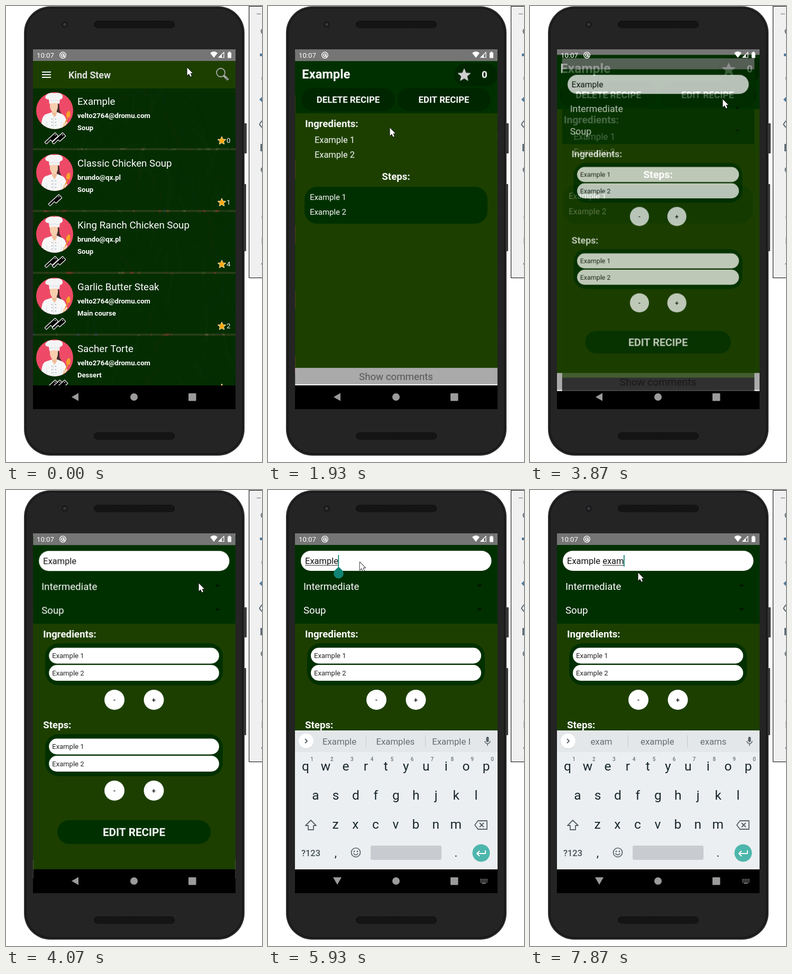
An HTML page with a canvas for the animation above (8 s loop, 484 by 863 pixels).

```html
<!DOCTYPE html>
<html lang="en">
<head>
<meta charset="utf-8">
<title>Recipe app</title>
<style>
html, body { margin: 0; width: 100%; height: 100%; overflow: hidden; background: #fff; }
canvas { display: block; }
</style>
</head>
<body>
<canvas id="stage" width="484" height="863"></canvas>
<script>
const LOOP = 8000, FPS = 15;
const DARK = '#003000', DEEP = '#002600', OLIVE = '#1c3f00';
const stage = document.getElementById('stage').getContext('2d');
let g = stage;

// ---- drawing helpers
function rect(x, y, w, h, color) { g.fillStyle = color; g.fillRect(x, y, w, h); }
function pill(x, y, w, h, r, color) {
  g.fillStyle = color; g.beginPath(); g.roundRect(x, y, w, h, r); g.fill();
}
function disc(x, y, r, color) {
  g.fillStyle = color; g.beginPath(); g.arc(x, y, r, 0, 7); g.fill();
}
function ring(x, y, r, color, width, from = 0, to = 2 * Math.PI) {
  g.strokeStyle = color; g.lineWidth = width;
  g.beginPath(); g.arc(x, y, r, from, to); g.stroke();
}
function shape(path, x, y, fill, stroke, width = 1) {
  const p = new Path2D(path);
  g.save(); g.translate(x, y);
  if (stroke) { g.strokeStyle = stroke; g.lineWidth = width; g.lineJoin = 'round'; g.stroke(p); }
  if (fill) { g.fillStyle = fill; g.fill(p); }
  g.restore();
}
function text(s, x, y, size, color = '#fff', weight = 400, align = 'left') {
  g.font = `${weight} ${size}px Roboto, sans-serif`;
  g.fillStyle = color; g.textAlign = align; g.fillText(s, x, y);
}
function bold(s, x, y, size, align) { text(s, x, y, size, '#fff', 700, align); }
function star(x, y, r, fill, stroke) {
  let path = '';
  for (let i = 0; i < 10; i++) {
    const a = i * Math.PI / 5, d = i % 2 ? r * 0.45 : r;
    path += `${i ? 'L' : 'M'}${d * Math.sin(a)} ${-d * Math.cos(a)}`;
  }
  shape(path + 'Z', x, y, fill, stroke, 1.5);
}
function layer(draw) {
  const c = document.createElement('canvas');
  c.width = 484; c.height = 863;
  const outer = g;
  g = c.getContext('2d'); draw(); g = outer;
  return c;
}
function randomizer(seed) {
  return () => (seed = (seed * 16807) % 2147483647) / 2147483647;
}

// ---- timing helpers
const clamp = v => Math.max(0, Math.min(1, v));
const cubic = (u, a, b, c, d) =>
  a * (1 - u) ** 3 + 3 * b * u * (1 - u) ** 2 + 3 * c * u * u * (1 - u) + d * u ** 3;

// Fast start, very slow finish
function openEase(x) {
  if (x <= 0 || x >= 1) return clamp(x);
  const [xs, ys] = x < 1 / 6
    ? [[0, 0.05, 0.1333, 0.1667], [0, 0, 0.06, 0.4]]
    : [[0.1667, 0.2083, 0.25, 1], [0.4, 0.82, 1, 1]];
  let lo = 0, hi = 1;
  for (let i = 0; i < 20; i++) {
    const mid = (lo + hi) / 2;
    if (cubic(mid, ...xs) < x) lo = mid; else hi = mid;
  }
  return cubic(lo, ...ys);
}

const pointerPath = [
  [0, 342, 116], [70, 347, 113], [200, 330, 130], [400, 262, 198], [600, 234, 230], [800, 234, 230],
  [930, 230, 230], [2130, 230, 230], [2300, 268, 228], [2470, 327, 213], [2730, 364, 176],
  [4600, 364, 176], [4730, 330, 150], [4870, 255, 113], [5000, 198, 108], [5130, 173, 134],
  [5200, 173, 134], [5270, 173, 136], [6330, 173, 136], [6530, 181, 139], [6600, 181, 139],
  [6730, 188, 140], [6800, 188, 140], [6930, 204, 156], [LOOP, 204, 156]
];
function pointerAt(t) {
  const i = pointerPath.findIndex(k => k[0] > t);
  const [t0, x0, y0] = pointerPath[i - 1], [t1, x1, y1] = pointerPath[i];
  const p = (t - t0) / (t1 - t0);
  return [Math.round(x0 + (x1 - x0) * p), Math.round(y0 + (y1 - y0) * p)];
}

// ---- device
function drawDevice() {
  rect(0, 0, 484, 863, '#fff');
  pill(450, 222, 5, 57, 1, '#3c3c3c');
  pill(450, 337, 4, 127, 1, '#3c3c3c');
  pill(34, 0.5, 417, 850.5, 50, '#303030');
  pill(36, 2.5, 413, 846.5, 48, '#191919');
  pill(39, 5, 407, 841, 45, '#242424');
  disc(111, 35, 6, '#18181a'); disc(111, 35, 3, '#36383b');
  for (const y of [28, 807]) {
    pill(166, y, 153, 14, 7, '#101010');
    for (let i = 0; i < 185; i++) rect(169 + (i % 37) * 4 + (i / 37 & 1) * 2, y + 2 + (i / 37 | 0) * 2.4, 1.2, 1.2, '#303030');
  }
  rect(459, 0, 25, 515, '#000');
  rect(460, 1, 24, 513, '#f0f0f0');
  rect(474, 14, 8, 2, '#aaa');
  const ink = '#5d6b76';
  for (const y of [48, 310]) ring(488, y, 5.5, ink, 2);
  rect(480, 90, 4, 5, '#4f7a9c');
  ring(488, 137, 5, '#999', 1);
  shape('M0 0L5 -5V5Z', 479, 177, '#4f7a9c');
  shape('M0 0L5 -7M0 0L5 6', 479, 224, null, ink, 2);
  rect(481, 261, 3, 14, ink);
  ring(488, 400, 5, '#bbb', 1);
  rect(483, 437, 1, 14, '#bbb');
  disc(484, 488, 1.5, ink);
}

// ---- app windows
function windowFrame(color) {
  rect(51, 82, 383, 22, '#757575');
  rect(51, 104, 383, 614, color);
  rect(51, 718, 383, 45, '#000');
}

function drawChef(x, y) {
  g.save();
  g.beginPath(); g.arc(x, y, 35, 0, 7); g.clip();
  rect(x - 35, y - 35, 70, 70, '#ee4a67');
  shape('M-4 -16Q9 -18 9 -8Q8 0 14 7L6 10L-2 2Z', x, y, '#4a2c30');
  shape('M-25 35Q-26 11 -17 7L-5 3H5L15 7Q21 11 24 24L17 28L16 35Z', x, y, '#f7f7f8');
  shape('M-5 0H4V6L0 13L-5 6Z', x, y, '#efbd98');
  shape('M-9 -15H6V-7Q5 3 -1 4Q-7 3 -9 -7Z', x, y, '#f7cfae');
  shape('M-10 -13L-11 -21Q-20 -22 -17 -28Q-11 -35 -1 -33Q12 -35 15 -28Q16 -22 10 -21L9 -13Q0 -16 -10 -13Z', x, y, '#f4f4f5');
  shape('M-10 -18Q0 -21 9 -18M-15 20V34M-2 13V34M13 20V34', x, y, null, '#d9dbde', 1);
  for (const dy of [16, 22, 28]) { disc(x - 5, y + dy, 0.9, '#8f98a3'); disc(x + 2, y + dy, 0.9, '#8f98a3'); }
  shape('M16 33L25 12', x, y, null, '#e98c22', 2);
  shape('M22 12Q21 3 27 0Q32 4 28 13Z', x, y, '#f6a22b');
  disc(x + 19, y + 26, 3, '#f7cfae');
  g.restore();
}

function drawCleavers(y, count) {
  const gap = count > 2 ? 9 : 14;
  const left = count === 1 ? 79 : 72;
  for (let i = 0; i < count; i++) {
    shape('M2 20L21 2.5L26 8L15.5 17.5L12.5 14.5L4.5 22.5Z', left + i * gap, y, '#000', '#fff', 2.4);
    disc(left + i * gap + 21, y + 6, 0.9, '#fff');
  }
}

function drawList() {
  windowFrame('#263c16');
  g.save();
  g.beginPath(); g.rect(51, 104, 383, 614); g.clip();
  const rnd = randomizer(77), tones = ['#565c34', '#35541f', '#7f3426', '#34455a', '#6a4a22', '#173516'];
  g.globalAlpha = 0.6;
  for (let i = 0; i < 260; i++) {
    const x = 40 + rnd() * 400, y = 150 + rnd() * 570, dx = rnd() * 70 - 35, dy = 10 + rnd() * 60;
    shape(`M0 0Q${dx} ${dy * rnd()} ${dx} ${dy}`, x, y, null, tones[Math.floor(rnd() * 6)], 1 + rnd() * 6);
  }
  g.globalAlpha = 1;
  rect(51, 104, 383, 52, OLIVE);
  for (const y of [124, 129, 134]) rect(68, y, 17, 2, '#fff');
  text('Kind Stew', 118, 137, 17.8, '#dedede', 700);
  ring(406, 126, 8, '#a9aaa6', 1.8);
  shape('M6 6L14 14', 406, 126, null, '#aaa', 4);
  shape('M9 10L14 15', 406, 126, null, '#333', 1);

  const cook = 'velto2764@dromu.com', guest = 'brundo@qx.pl';
  [
    ['Example', cook, 'Soup', 2, 0],
    ['Classic Chicken Soup', guest, 'Soup', 1, 1],
    ['King Ranch Chicken Soup', guest, 'Soup', 2, 4],
    ['Garlic Butter Steak', cook, 'Main course', 2, 2],
    ['Sacher Torte', cook, 'Dessert', 3, 3]
  ].forEach(([title, author, kind, level, stars], i) => {
    const y = 156 + 117 * i;
    rect(51, y, 383, 113, 'rgba(0,44,0,.9)');
    drawChef(92, y + 42);
    drawCleavers(y + 82, level);
    text(title, 135, y + 30.5, 18.7);
    bold(author, 135, y + 55.5, 13.1);
    bold(kind, 135, y + 79, 13.1);
    star(408, y + 99, 7.5, '#fba80f', '#fff0c8');
    text(stars, 417, y + 103, 13.1);
  });
  g.restore();
}

function drawDetail() {
  windowFrame(OLIVE);
  rect(51, 104, 383, 99, DARK);
  bold('Example', 64, 137, 23.8);
  pill(352, 108, 82, 44, 22, DEEP);
  star(371, 131, 12, '#d0d0d0', '#aaa');
  bold('0', 404, 136, 18.7);
  pill(63, 155, 177, 44, 22, DEEP);
  pill(245, 155, 176, 44, 22, DEEP);
  bold('DELETE RECIPE', 151.5, 183, 16.8, 'center');
  bold('EDIT RECIPE', 332.5, 183, 16.8, 'center');
  bold('Ingredients:', 70, 229, 18.7);
  text('Example 1', 88, 259, 16.4);
  text('Example 2', 88, 287, 16.4);
  bold('Steps:', 242, 329, 18.7, 'center');
  pill(69, 342, 346, 70, 24, DARK);
  text('Example 1', 79, 367, 14.9);
  text('Example 2', 79, 395, 14.9);
  rect(51, 685, 383, 33, '#aaa');
  rect(51, 716, 383, 2, '#fff');
  text('Show comments', 242, 708, 18.7, '#555', 400, 'center');
}

function drawEditor() {
  windowFrame(OLIVE);
  rect(51, 104, 383, 149, DARK);
  pill(62, 115, 360.5, 38, 19, '#fff');
  text('Intermediate', 67, 189, 18.7);
  text('Soup', 67, 234, 18.7);
  for (const y of [179, 224]) shape('M0 0H10L5 5Z', 395, y, '#001500');
  [['Ingredients:', 290], ['Steps:', 462]].forEach(([label, y]) => {
    bold(label, 70, y - 11, 18.7);
    pill(74, y, 336, 79.5, 25, DARK);
    for (const n of [1, 2]) {
      const top = y - 24 + n * 32.5;
      pill(81, top, 322, 30, 15, '#fff');
      text('Example ' + n, 87, top + 19.5, 13.1, '#222');
    }
    for (const [x, sign] of [[205, '-'], [279.5, '+']]) {
      disc(x, y + 107, 19, '#fff');
      text(sign, x, y + 112, 13.1, '#111', 500, 'center');
    }
  });
  pill(97, 625, 290, 45, 22.5, DARK);
  bold('EDIT RECIPE', 242, 655, 20.7, 'center');
}

// ---- text entry
const typed = [[0, ''], [6400, ' '], [7330, ' e'], [7530, ' ex'], [7730, ' exa'], [7870, ' exam']];
const suggestions = [
  [0, []], [5800, ['Example', 'Examples', 'Example I']], [6470, ['of', 'is', 'and']],
  [7330, ['e', 'even', 'every']], [7530, ['ex', 'extra', 'exact']],
  [7730, ['exa', 'exam', 'exact']], [7870, ['exam', 'example', 'exams']]
];
const latest = (list, t) => list.filter(k => k[0] <= t).pop()[1];

function drawField(t) {
  const word = 'Example', added = latest(typed, t), end = s => {
    g.font = '400 16.5px Roboto, sans-serif';
    return 70 + g.measureText(s).width;
  };
  text(word + added, 70, 140, 16.5, '#111');
  const caretX = end(word + added);
  if (t >= 5800 && t < 6400) rect(70, 142, caretX - 70, 1, '#333');
  if (added.length > 1) rect(end(word + ' '), 142, caretX - end(word + ' '), 1, '#333');
  if ((t >= 5330 && t < 6200) || (t >= 6400 && t < 6930) || t >= 7330) rect(caretX - 0.5, 123, 1.6, 22, '#00796b');
  if (t >= 5530 && t < 6400) shape('M0 -13L7 -6A9.3 9.3 0 1 1 -7 -6Z', 133.5, 158, '#108575');
}

function drawKeyboard(t) {
  const ink = '#17262d', soft = '#566167';
  rect(51, 455, 383, 263, '#eceff1');
  rect(51, 455, 383, 41, '#e4e7e9');
  disc(72, 476, 14, '#d4d7d9'); disc(72, 475, 14, '#fff');
  shape('M-2 -4L2 0L-2 4', 72, 475, null, soft, 1.8);
  for (const x of [185, 297]) rect(x, 464, 1, 23, '#c3c8cb');
  latest(suggestions, t).forEach((s, i) => text(s, 135 + 105.8 * i, 482, 16.8, '#646d72', 400, 'center'));
  pill(412.5, 467, 5, 10, 2.5, soft);
  shape('M-5 -2A5 5 0 0 0 5 -2M0 3V7', 415, 477, null, soft, 1.5);

  [['qwertyuiop', 71, 531], ['asdfghjkl', 90, 586], ['zxcvbnm', 127.5, 641]].forEach(([keys, x, y]) =>
    [...keys].forEach((k, i) => text(k, x + 37.95 * i, y, 24.5, ink, 400, 'center')));
  for (let i = 0; i < 10; i++) text((i + 1) % 10, 83 + 37.9 * i, 513, 10, '#69757b', 500, 'center');

  shape('M0 -9L10 1H5V9H-5V1H-10Z', 81, 634, null, soft, 1.8);
  shape('M-12 0L-6 -8H11V8H-6ZM-3 -4L5 4M5 -4L-3 4', 403, 634, null, soft, 1.8);
  text('?123', 81, 693, 16.4, '#455157', 500, 'center');
  text(',', 128, 694, 22, ink, 400, 'center');
  text('.', 355.5, 694, 22, ink, 400, 'center');
  ring(166, 686, 8.5, soft, 1.7);
  disc(163, 684, 1.4, soft); disc(169, 684, 1.4, soft);
  ring(166, 686, 4.5, soft, 1.5, 0.3, 2.84);
  pill(194, 673, 134, 27, 3, '#c8ccd0');
  disc(403, 687, 16.5, '#4db6ac');
  shape('M8 -5V1H-7M-3 -4L-8 1L-3 6', 403, 687, null, '#fff', 1.9);
}

// ---- system bars and pointer
function drawSystemBars(keyboardOpen) {
  text('10:07', 58, 98, 13.2);
  ring(107.5, 93, 5.7, '#fff', 1.4);
  ring(107.5, 93, 2.5, '#fff', 1.5);
  shape('M0 0L4 4', 108, 93, null, '#fff', 1.5);
  shape('M0 2Q7 -4 14 2L7 11Z', 386, 87, '#fff');
  shape('M0 10L10 0V10Z', 402, 87.5, null, '#fff', 1.2);
  shape('M0 10L6 4V10Z', 402, 87.5, '#fff');
  pill(419, 88, 7, 10.5, 1, '#fff'); rect(421, 86.5, 3, 2, '#fff');

  const grey = '#9b9b9b';
  shape(keyboardOpen ? 'M-8 -7H8L0 7Z' : 'M-7 0L6 -7.5V7.5Z', 131, 740, grey);
  disc(242, 740, 7, grey);
  pill(345, 733, 14.5, 14.5, 1, grey);
  if (keyboardOpen) {
    for (let i = 0; i < 18; i++) rect(401 + (i % 6) * 2.5, 736 + Math.floor(i / 6) * 2.5, 1.5, 1.5, grey);
    rect(404, 743.5, 8, 1.5, grey);
  }
}

function drawPointer(x, y) {
  shape('M.5 .5V15.5L4 12.3L6.5 17.8L9 16.7L6.6 11.3H11Z', x, y, '#fff', '#000', 1.6);
}

// ---- scene
const device = layer(drawDevice);
const listPage = layer(drawList), detailPage = layer(drawDetail);
const centerX = 242.5, centerY = 422.5;

function place(page, scale, alpha) {
  g.save();
  g.globalAlpha = alpha;
  g.translate(centerX, centerY); g.scale(scale, scale); g.translate(-centerX, -centerY);
  g.beginPath(); g.rect(51, 82, 383, 681); g.clip();
  g.drawImage(page, 0, 0);
  g.restore();
}

function openPage(from, to, elapsed) {
  const p = openEase(elapsed / 350);
  if (p < 1) place(from, 1 + 0.054 * p, 1);
  place(to, 0.85 + 0.15 * p, clamp((elapsed - 30) / 60));
}

function render(t) {
  g.drawImage(device, 0, 0);
  g.save();
  g.beginPath(); g.rect(51, 82, 383, 681); g.clip();
  const editor = () => layer(() => { drawEditor(); drawField(t); });
  if (t < 1670) place(listPage, 1, 1);
  else if (t < 3870) openPage(listPage, detailPage, t - 1643);
  else openPage(detailPage, editor(), t - 3797);

  if (t >= 5470) {
    const p = 1 - (1 - clamp((t - 5430) / 280)) ** 2;
    const keys = layer(() => drawKeyboard(t));
    g.beginPath(); g.rect(51, 82, 383, 636); g.clip();
    g.globalAlpha = p;
    g.drawImage(keys, 0, 52 * (1 - p));
  }
  g.restore();
  drawSystemBars(t >= 5530);
  drawPointer(...pointerAt(t));
}

let shown = -1;
function tick(now) {
  const step = Math.floor((now % LOOP + 4) * FPS / 1000) % (LOOP * FPS / 1000);
  if (step !== shown) render(Math.round(step * 100 / FPS) * 10);
  shown = step;
  requestAnimationFrame(tick);
}
requestAnimationFrame(tick);
</script>
</body>
</html>
```
